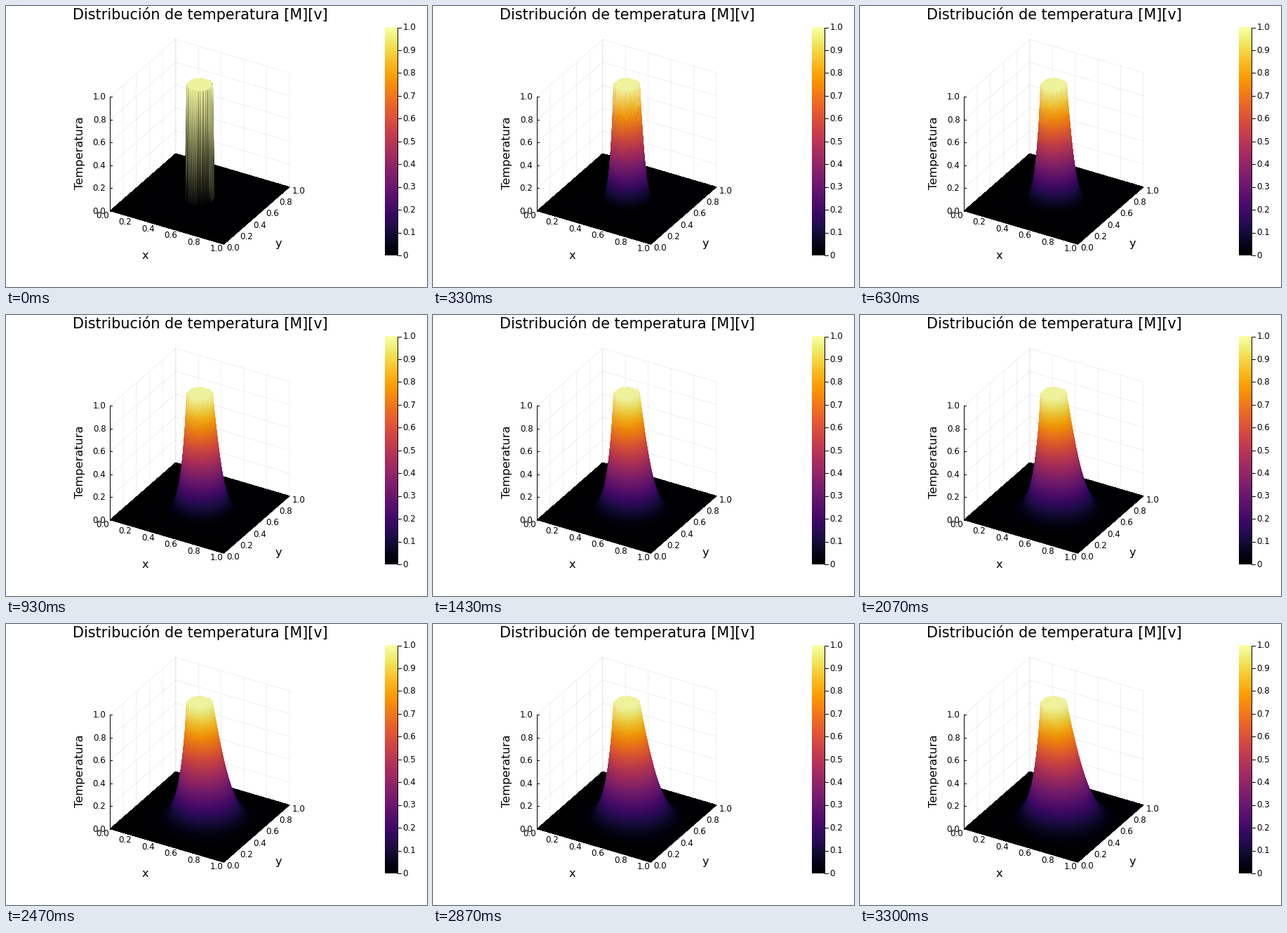
A matplotlib script that plays this animation: 600 by 400 pixels, repeating every 3330 ms.

```python
import numpy as np
import matplotlib.pyplot as plt
from matplotlib.animation import FuncAnimation
from matplotlib.colors import ListedColormap
from matplotlib.tri import Triangulation

W, H = 600, 400
FRAMES, LOOP_MS = 100, 3330
N = 101                          # grid points per side
RADIUS = 0.1                     # hot disk held at 1
DIFFUSION = 9e-5                 # per frame
WIND = 1e-3                      # along x, per frame
SUBSTEPS = 4

plt.rcParams["font.family"] = "DejaVu Sans"


def project(x, y, z):
    """Orthographic view of the unit cube in stage pixels."""
    return 148.4 + 162 * x + 93.5 * y, 291.6 + 47.5 * x - 81.5 * y - 162.5 * z


def simulate():
    """Heat spreading from a fixed hot disk in a weak drift."""
    axis = np.linspace(0, 1, N)
    x, y = np.meshgrid(axis, axis, indexing="ij")
    hot = np.hypot(x - 0.5, y - 0.5) < RADIUS - 1e-9
    h = axis[1]
    k = DIFFUSION / SUBSTEPS / h**2
    c = WIND / SUBSTEPS / (2 * h)
    u = hot.astype(float)
    fields = [u]
    for _ in range(FRAMES - 1):
        for _ in range(SUBSTEPS):
            west, east = np.roll(u, 1, 0), np.roll(u, -1, 0)
            south, north = np.roll(u, 1, 1), np.roll(u, -1, 1)
            u = u + k * (west + east + south + north - 4 * u) - c * (east - west)
            u[hot] = 1
        fields.append(u)
    return x, y, np.clip(fields, 0, 1)


def back_to_front(n):
    """Two triangles per cell, farthest cells first."""
    i, j = np.meshgrid(np.arange(n - 1), np.arange(n - 2, -1, -1), indexing="ij")
    a = (i * n + j).ravel()
    b, c, d = a + n, a + 1, a + n + 1
    return np.stack([np.stack([a, d, c], 1), np.stack([a, b, d], 1)], 1).reshape(-1, 3)


fig = plt.figure(figsize=(W / 100, H / 100), dpi=100, facecolor="white")
ax = fig.add_axes([0, 0, 1, 1])
ax.axis("off")


def line(p, q, width=1.0, **kw):
    ax.plot([p[0], q[0]], [p[1], q[1]], color="black", lw=width * 0.72, **kw)


def label(x, y, text, px=11.9, ha="center", va="center", **kw):
    ax.text(x, y, text, fontsize=px * 0.72, ha=ha, va=va, **kw)


# Grid on the two back walls
ticks = np.linspace(0, 1, 6)
for t in ticks:
    for p, q in (((t, 1, 0), (t, 1, 1)), ((0, 1, t), (1, 1, t)),
                 ((0, t, 0), (0, t, 1)), ((0, 0, t), (0, 1, t))):
        line(project(*p), project(*q), alpha=0.08, width=0.8, snap=False, zorder=1)

# Black floor
corners = [project(*c, 0) for c in ((0, 0), (1, 0), (1, 1), (0, 1))]
ax.fill(*zip(*corners), color="black", lw=0, antialiased=False, zorder=2)

# Surface around the column, slightly dimmed by the light
gx, gy, fields = simulate()
part = slice(12, 100)
gx, gy, fields = gx[part, part], gy[part, part], fields[:, part, part]
px, py = project(gx, gy, fields[0])
tri = Triangulation(px.ravel(), py.ravel(), back_to_front(gx.shape[0]))
lit = ListedColormap(plt.get_cmap("inferno")(np.arange(256))[:, :3] * 0.95)
surface = ax.tripcolor(tri, fields[0].ravel(), shading="gouraud",
                       cmap=lit, vmin=0, vmax=1, zorder=3)

# Axes and their labels
line(project(0, 0, 0), project(0, 0, 1), zorder=4)
line(project(0, 0, 0), project(1, 0, 0), zorder=4)
line(project(1, 0, 0), project(1, 1, 0), zorder=4)
for t in ticks:
    name = f"{t:.1f}"
    zx, zy = project(0, 0, t)
    line((zx, zy), (zx + 2.5, zy), zorder=4)
    label(zx - 6, zy + 0.5, name, ha="right")
    xx, xy = project(t, 0, 0)
    label(xx - 10.7, xy + 6.8, name)
    yx, yy = project(1, t, 0)
    label(yx + 13.6, yy + 5.5, name)

label(276.5, 19, "Distribución de temperatura [M][v]", 20.8, va="baseline")
label(198.3, 360, "x", 16.3, va="baseline")
label(388.5, 343, "y", 16.3, va="baseline")
label(105.2, 209, "Temperatura", 16.2, rotation=90)

# Colour bar
ax.imshow(np.linspace(1, 0, 256)[:, None], cmap="inferno", aspect="auto",
          extent=(540, 558, 355, 30.5), interpolation="bilinear", zorder=2)
line((558, 355), (558, 30.5), zorder=4)
for n in range(11):
    y = 355 - 32.45 * n
    line((558, y), (563, y), zorder=4)
    label(565.3, y + 0.3, f"{n / 10:.1f}" if n else "0", ha="left")

ax.set_xlim(0, W)
ax.set_ylim(H, 0)


def draw(frame):
    z = fields[frame]
    tri.y[:] = project(gx, gy, z)[1].ravel()
    surface.set_array(z.ravel())
    return (surface,)


anim = FuncAnimation(fig, draw, frames=FRAMES, interval=LOOP_MS / FRAMES,
                     repeat=True, repeat_delay=0, blit=False)
plt.show()
```
